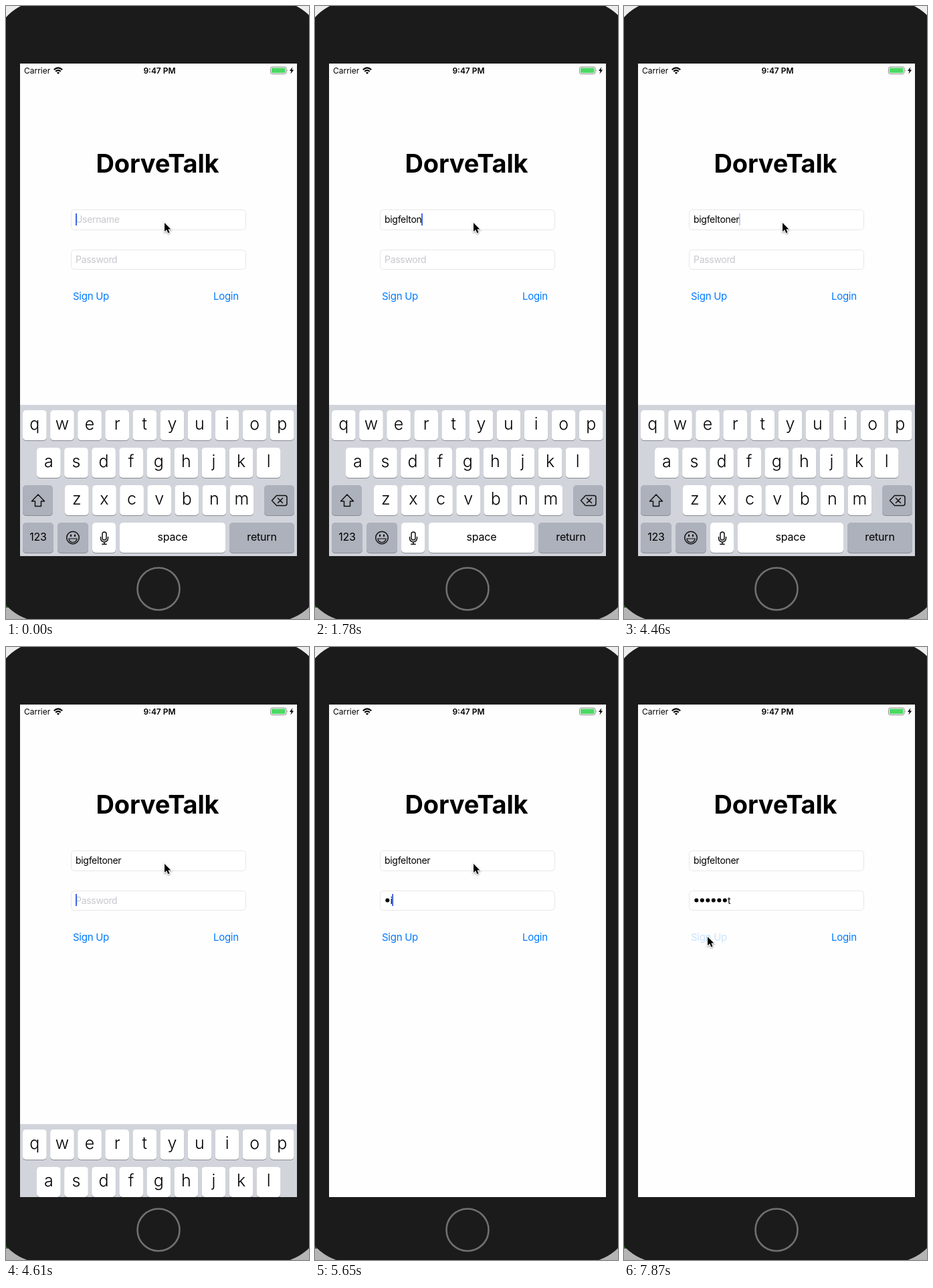
Animation of 453x916 px, one loop 8000 ms. Source, as an HTML page:

```html
<!DOCTYPE html>
<html lang="en">
<head>
<meta charset="utf-8">
<title>Login screen</title>
<style>
  html, body { margin: 0; width: 100%; height: 100%; overflow: hidden; }
  svg { display: block; width: 100%; height: 100%; font-family: Inter, "Liberation Sans", sans-serif; }
  .title { font-size: 38px; font-weight: 700; letter-spacing: -.2px; }
  .status { font-size: 12px; }
  .input { font-size: 14px; letter-spacing: -.3px; }
  .hint { fill: #c7c7cd; }
  .link { font-size: 15px; letter-spacing: -.27px; fill: #007aff; }
  .box { fill: #fff; stroke: #e7e7e7; }
  .letter { font-size: 25px; font-weight: 350; }
  .word { font-size: 16px; letter-spacing: -.2px; }
  .mid { text-anchor: middle; }
  .icon { fill: none; stroke: #111; stroke-width: 1.5; stroke-linejoin: round; stroke-linecap: round; }
  #pointer { stroke: #fff; stroke-width: 2; paint-order: stroke; filter: drop-shadow(0 1px 1px rgba(0, 0, 0, .4)); }
</style>
</head>
<body>
<svg viewBox="0 0 453 916" preserveAspectRatio="none">
  <defs>
    <linearGradient id="desk" x2="0" y2="1">
      <stop offset="0" stop-color="#ededed"/><stop offset="1" stop-color="#b4b4b4"/>
    </linearGradient>
    <clipPath id="screen"><rect x="21" y="86" width="414" height="736"/></clipPath>
  </defs>

  <rect width="453" height="916" fill="url(#desk)"/>
  <rect y="894" width="3" height="5" fill="#2c5a24"/>
  <rect x="-14" y="-9" width="484" height="930" rx="75" ry="62" fill="#1b1b1b"/>
  <circle cx="228" cy="871" r="31.5" fill="none" stroke="#707070" stroke-width="2.6"/>
  <rect x="21" y="86" width="414" height="736" fill="#fefefe"/>

  <!-- Status bar -->
  <text class="status" x="27" y="101">Carrier</text>
  <g fill="none" stroke="#000" stroke-width="2.2">
    <path d="M71.8 95.2Q78 89.4 84.2 95.2M74.2 97.8Q78 94.3 81.8 97.8"/>
    <path d="M78 101.8L75.8 99.6Q78 97.8 80.2 99.6Z" fill="#000" stroke="none"/>
  </g>
  <text class="status mid" x="229.5" y="101" font-weight="600">9:47 PM</text>
  <rect x="395.5" y="91" width="23.5" height="10.5" rx="2.5" fill="none" stroke="#8a8a8a"/>
  <rect x="397" y="92.5" width="20.5" height="7.5" rx="1.2" fill="#4cd964"/>
  <path d="M420.2 94.5q1.6 1.8 0 3.6z" fill="#8a8a8a"/>
  <path d="M428.5 91L424 97h2.6l-1.2 4.6L430.2 95.4h-2.8z"/>

  <!-- Form -->
  <text class="title mid" x="226.5" y="249">DorveTalk</text>
  <rect class="box" x="97.5" y="304.5" width="261" height="30" rx="5"/>
  <rect class="box" x="97.5" y="364.5" width="261" height="29" rx="5"/>
  <text class="input hint" id="nameHint" x="104" y="324">Username</text>
  <text class="input hint" id="passHint" x="104" y="383.5">Password</text>
  <text class="input" id="name" x="104" y="324"></text>
  <g id="dots"></g>
  <text class="input" id="pass" y="383.5"></text>
  <rect id="caret" width="2" height="18" fill="#4169e6"/>
  <text class="link" id="signUp" x="100" y="439">Sign Up</text>
  <text class="link" x="310" y="439">Login</text>

  <g clip-path="url(#screen)">
    <g id="keyboard">
      <rect x="21" y="596" width="414" height="226" fill="#d1d4db"/>
      <g id="keys"></g>
      <g class="icon">
        <path d="M48 730L38.5 740H43.5V747.5H52.5V740H57.5Z"/>
        <path d="M397.5 739L404.5 731.5H417q3 0 3 3V743.5q0 3-3 3H404.5ZM406.5 735.5l7 7m0-7l-7 7"/>
        <circle cx="100" cy="794.5" r="9.3"/>
        <path d="M93.8 796H106.2Q105 801.5 100 801.5T93.8 796Z" stroke-width="1.2"/>
        <path d="M97 790.5v1.6m6-1.6v1.6" stroke-width="2.2"/>
        <rect x="144" y="786" width="6" height="12" rx="3"/>
        <path d="M141.5 793.5v2a5.5 5.5 0 0 0 11 0v-2M147 801v3.2M143.8 804.2h6.4"/>
      </g>
    </g>
  </g>

  <path id="pointer" d="M0 0V13L3.2 10.2L5.4 15.2L7.6 14.2L5.4 9.4H9.4Z"/>
</svg>

<script>
const LOOP = 8000;
const USER = 'bigfeltoner';
const LEFT = 104, DOT_PITCH = 8.5;
const $ = id => document.getElementById(id);

// Each list holds [start time, value, ...]; a value stays until the next start.
const nameSteps = [[0, 0], [440, 1], [590, 2], [740, 3], [1040, 4], [1180, 5], [1330, 7], [1630, 8],
  [1780, 9], [2670, 9, 'r'], [3270, 9], [3560, 10], [3860, 11]];
const passSteps = [[0, 0], [5500, 1], [5650, 2], [5800, 3], [5950, 4], [6090, 5], [6240, 7]];
const caretSteps = [[0, 1], [140, .4], [290, 0], [440, 1], [2380, .4], [2530, 0], [2670, 1], [4460, .35],
  [4610, 1], [5050, .4], [5200, 0], [5350, .4], [5500, 1], [6830, .15], [6980, 0], [7280, 1],
  [7720, .4], [7870, 0]];
const pointerSteps = [[0, 237, 324], [6830, 236, 326], [6980, 246, 352], [7130, 263, 398], [7280, 271, 440],
  [7430, 255, 455], [7570, 190, 452], [7720, 134, 437], [7870, 125, 433]];
const slideSteps = [[0], [4610], [4760], [4900], [5050], [5200]];
const FOCUS_PASSWORD = 4610, PRESS = 7870;

const at = (steps, t) => steps.findLast(([start]) => start <= t);

function add(parent, tag, attrs, text = '') {
  const el = document.createElementNS('http://www.w3.org/2000/svg', tag);
  for (const key in attrs) el.setAttribute(key, attrs[key]);
  el.textContent = text;
  parent.append(el);
  return el;
}

function addKey(x, y, width, label = '', fill = '#fff') {
  const shape = { x, width, height: 45, rx: 5 };
  add($('keys'), 'rect', { ...shape, y: y + 1, fill: '#898b90' });
  add($('keys'), 'rect', { ...shape, y, fill });
  const isLetter = label.length === 1;
  add($('keys'), 'text', {
    class: isLetter ? 'letter mid' : 'word mid', x: x + width / 2, y: y + (isLetter ? 29 : 27)
  }, label);
}

const GRAY = '#adb1bb';
[['qwertyuiop', 25, 604], ['asdfghjkl', 46, 660], ['zxcvbnm', 88, 716]].forEach(([row, x, y]) =>
  [...row].forEach((letter, i) => addKey(x + i * 41.1, y, 35.7, letter)));
addKey(25, 716, 45, '', GRAY);
addKey(386, 716, 45, '', GRAY);
addKey(25, 772, 46, '123', GRAY);
addKey(77, 772, 46, '', GRAY);
addKey(129, 772, 35);
addKey(170, 772, 158, 'space');
addKey(334, 772, 97, 'return', GRAY);

const dots = Array.from({ length: 6 }, (_, i) =>
  add($('dots'), 'circle', { cx: LEFT + 4.3 + i * DOT_PITCH, cy: 378.5, r: 3 }));

// Critically damped spring, from 0 to 1
function spring(ms) {
  const p = Math.max(0, ms) * .01826;
  return 1 - (1 + p) * Math.exp(-p);
}

function draw(t) {
  const [, nameLength, typo = ''] = at(nameSteps, t);
  const passLength = at(passSteps, t)[1];
  const hidden = Math.max(0, passLength - 1);
  const inPassword = t >= FOCUS_PASSWORD;

  $('name').textContent = USER.slice(0, nameLength) + typo;
  $('nameHint').style.opacity = nameLength ? 0 : 1;
  $('passHint').style.opacity = passLength ? 0 : 1;
  dots.forEach((dot, i) => dot.style.opacity = i < hidden ? 1 : 0);
  $('pass').textContent = USER.slice(hidden, passLength);
  $('pass').setAttribute('x', LEFT + hidden * DOT_PITCH);

  const typed = inPassword
    ? hidden * DOT_PITCH + (passLength && $('pass').getComputedTextLength())
    : nameLength && $('name').getComputedTextLength();
  $('caret').setAttribute('x', LEFT + Math.max(0, typed - .5));
  $('caret').setAttribute('y', inPassword ? 369 : 310);
  $('caret').style.opacity = at(caretSteps, t)[1];

  const slide = 226 * spring(at(slideSteps, t)[0] - 4515);
  $('keyboard').setAttribute('transform', `translate(0 ${slide.toFixed(1)})`);
  $('keyboard').style.display = slide > 225.5 ? 'none' : '';

  const [, x, y] = at(pointerSteps, t);
  $('pointer').setAttribute('transform', `translate(${x} ${y})`);
  $('signUp').style.opacity = t >= PRESS ? .2 : 1;
}

const start = performance.now();
function tick() {
  draw((performance.now() - start) % LOOP);
  requestAnimationFrame(tick);
}
tick();
</script>
</body>
</html>
```
